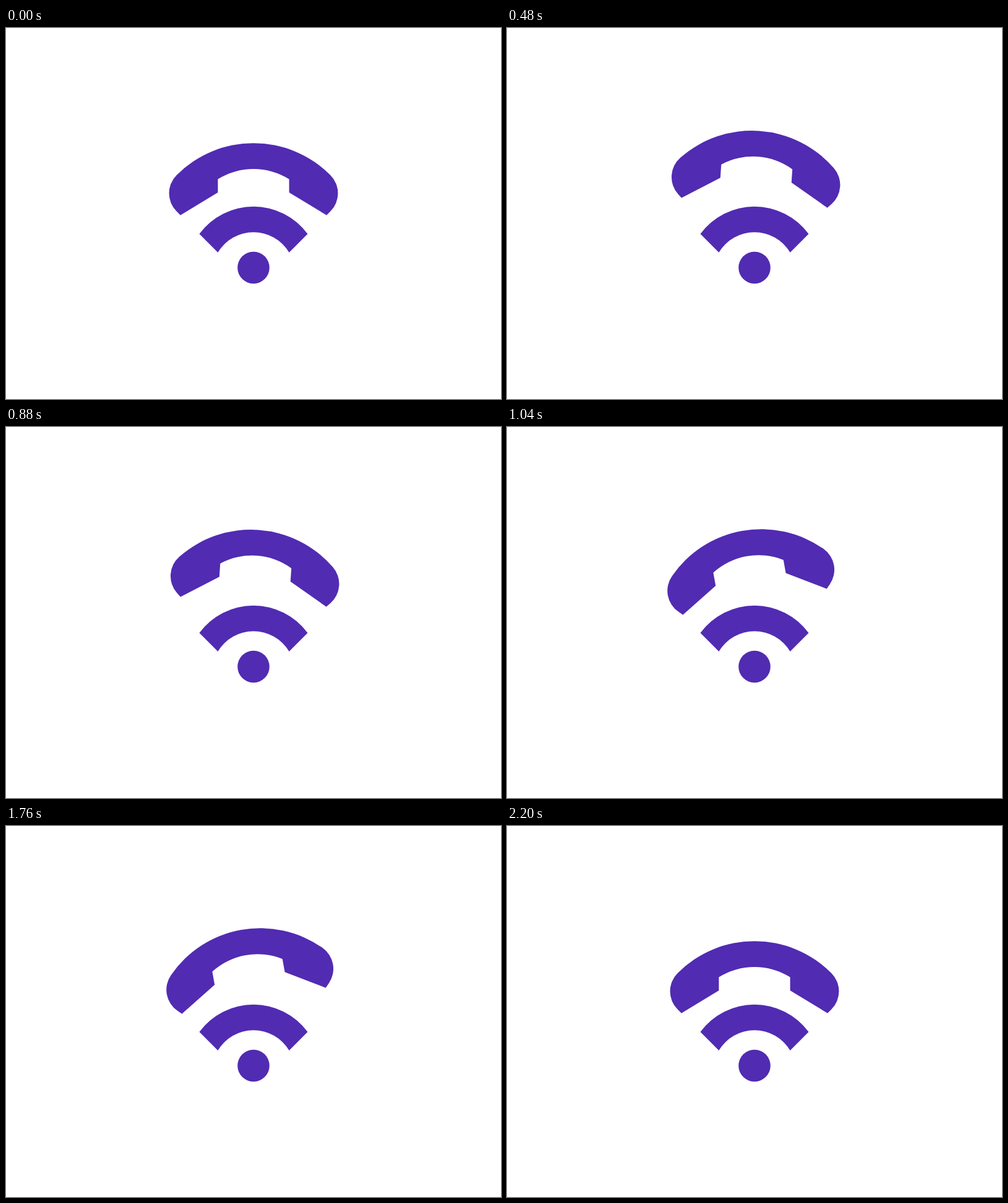
Recreate the animation shown at these times as an HTML page. Size 800 by 600 pixels, loop 2400 ms.

```html
<!DOCTYPE html>
<html lang="en">
<head>
<meta charset="utf-8">
<title>Ringing handset</title>
<style>
  html, body { margin: 0; width: 100%; height: 100%; overflow: hidden; background: #fff; }
  svg { display: block; width: 800px; height: 600px; fill: #512bb2; }
</style>
</head>
<body>
<svg viewBox="0 0 800 600">
  <path id="handset" d="M275.7 238A175 175 0 0 1 524.3 238A41.4 41.4 0 0 1 524.3 296.6L518.1 302.8L457.6 266V244.4A109 109 0 0 0 342.4 244.4V266L281.9 302.8L275.7 296.6A41.4 41.4 0 0 1 275.7 238Z"/>
  <path d="M312.5 333.1A108.4 108.4 0 0 1 487.5 333.1L457.6 363A67.1 67.1 0 0 0 342.4 363Z"/>
  <circle cx="400" cy="387.6" r="25.8"/>
</svg>
<script>
  const LOOP = 2400, STEP = 40, SWING = 200, SWINGS = 11;
  const ANGLE = 13, LIFT = 20;
  const handset = document.getElementById('handset');

  const ease = p => p * p * (3 - 2 * p);
  // Rest at both ends, alternating extremes in between.
  const angleAt = k => k === 0 || k >= SWINGS ? 0 : k % 2 ? -ANGLE : ANGLE;
  const liftAt = k => k === 0 || k >= SWINGS ? 0 : LIFT;

  function draw(now) {
    const t = Math.floor((now % LOOP) / STEP) * STEP;
    const k = Math.floor(t / SWING);
    const p = ease(t % SWING / SWING);
    const mix = at => at(k) + (at(k + 1) - at(k)) * p;
    handset.setAttribute('transform', `translate(0 ${-mix(liftAt)}) rotate(${mix(angleAt)} 400 300)`);
  }

  const start = performance.now();
  function tick() {
    draw(performance.now() - start);
    requestAnimationFrame(tick);
  }
  tick();
</script>
</body>
</html>
```
